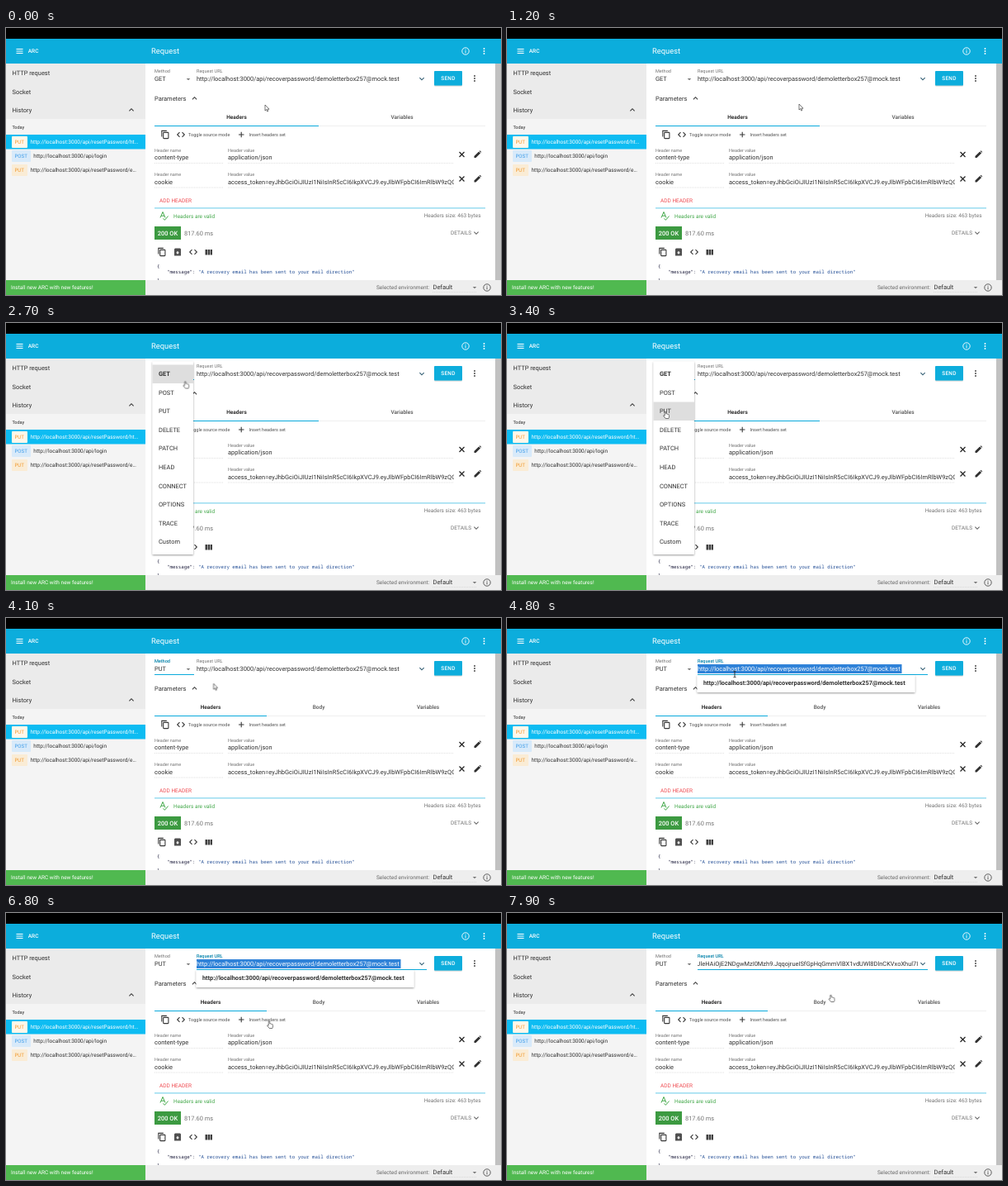
An HTML page for the animation above (8 s loop, 600x323 px).

```html
<!DOCTYPE html>
<html lang="en">
<head>
<meta charset="utf-8">
<title>Request client</title>
<style>
html, body { margin: 0; width: 100%; height: 100%; overflow: hidden; background: #fff; }
svg { display: block; width: 100%; height: 100%; }
text { font: 7.45px Roboto, Arial, sans-serif; fill: #303030; text-rendering: geometricPrecision; white-space: pre; }
.tiny { font-size: 5.55px; fill: #727272; }
.mid { font-size: 6.5px; }
.badge { font-size: 6.1px; }
.gray { fill: #757575; }
.white { fill: #fff; }
.bold { font-weight: 700; }
.semi { font-weight: 500; }
.mono { font: 500 5.76px "Noto Sans Mono", "DejaVu Sans Mono", monospace; fill: #1b1b3a; }
.blue { fill: #0aaadc; }
.center { text-anchor: middle; }
.end { text-anchor: end; }
.dots { fill: none; stroke: #ccc; stroke-width: .6; stroke-dasharray: 1 1; }
.focus { fill: none; stroke: #0aaadc; stroke-width: 1; }
.icon { fill: none; stroke: #383838; stroke-width: 1.1; }

/* State switches */
.loop { animation: 8s step-end infinite; }
.get { animation-name: get; }
.put { animation-name: put; }
.method-focus { animation-name: method-focus; }
.menu { animation-name: menu; }
.hover-get { animation-name: hover-get; }
.hover-post { animation-name: hover-post; }
.hover-put { animation-name: hover-put; }
.url-focus { animation-name: url-focus; }
.picked { animation-name: picked; }
.plain { animation-name: plain; }
.pasted { animation-name: pasted; }
.arrow { animation-name: arrow; }
.hand { animation-name: hand; }
.beam { animation-name: beam; }
@keyframes get { 0% { opacity: 1 } 45%, 100% { opacity: 0 } }
@keyframes put { 0% { opacity: 0 } 45%, 100% { opacity: 1 } }
@keyframes method-focus { 0% { opacity: 0 } 27.5% { opacity: 1 } 56.25%, 100% { opacity: 0 } }
@keyframes menu { 0% { opacity: 0 } 31.25% { opacity: 1 } 45%, 100% { opacity: 0 } }
@keyframes hover-get { 0% { opacity: 1 } 35%, 100% { opacity: 0 } }
@keyframes hover-post { 0% { opacity: 0 } 35% { opacity: 1 } 38.75%, 100% { opacity: 0 } }
@keyframes hover-put { 0% { opacity: 0 } 38.75%, 100% { opacity: 1 } }
@keyframes url-focus { 0% { opacity: 0 } 56.25%, 100% { opacity: 1 } }
@keyframes picked { 0% { opacity: 0 } 56.25% { opacity: 1 } 91.25%, 100% { opacity: 0 } }
@keyframes plain { 0% { opacity: 1 } 56.25%, 100% { opacity: 0 } }
@keyframes pasted { 0% { opacity: 0 } 91.25%, 100% { opacity: 1 } }
@keyframes arrow {
  0% { opacity: 1 } 26.25% { opacity: 0 } 46.25% { opacity: 1 }
  53.75% { opacity: 0 } 76.25% { opacity: 1 } 81.25%, 100% { opacity: 0 }
}
@keyframes hand { 0% { opacity: 0 } 26.25% { opacity: 1 } 46.25% { opacity: 0 } 81.25%, 100% { opacity: 1 } }
@keyframes beam { 0% { opacity: 0 } 53.75% { opacity: 1 } 76.25%, 100% { opacity: 0 } }

/* Continuous motion */
.cursor { animation: travel 8s ease-in-out infinite; }
@keyframes travel {
  0% { transform: translate(314px, 93px) }
  13.75%, 16.25% { transform: translate(354px, 92px) }
  27.5%, 31.25% { transform: translate(222.5px, 63px) }
  40%, 45% { transform: translate(192px, 107px) }
  55%, 73.75% { transform: translate(276px, 68px) }
  83.75%, 88.75% { transform: translate(319px, 131px) }
  97.5%, 100% { transform: translate(392.5px, 99px) }
}
.ripple { animation: ripple 8s linear infinite; transform-origin: 216px 60px; }
@keyframes ripple {
  0%, 27.5% { transform: scale(.1); opacity: .4 }
  28.75% { transform: scale(1); opacity: .4 }
  31.25%, 100% { transform: scale(1.6); opacity: 0 }
}
.grow { animation: grow 8s linear infinite; transform-origin: 204px 68.5px; }
@keyframes grow {
  0%, 27.5% { transform: scaleX(0) }
  29.2%, 100% { transform: scaleX(1) }
}
</style>
</head>
<body>
<svg viewBox="0 0 600 323" preserveAspectRatio="none">
  <defs>
    <clipPath id="methodBox"><rect x="180" y="48" width="48" height="21"/></clipPath>
    <clipPath id="urlBox"><rect x="231" y="54" width="268" height="14"/></clipPath>
    <clipPath id="valueBox"><rect x="269" y="180" width="274" height="12"/></clipPath>
    <clipPath id="codeBox"><rect x="169" y="280" width="424" height="25"/></clipPath>
    <filter id="shadow" x="-20%" y="-20%" width="140%" height="140%">
      <feDropShadow dx="0" dy="1" stdDeviation="1.3" flood-opacity=".4"/>
    </filter>
    <filter id="lift" x="-20%" y="-20%" width="140%" height="150%">
      <feDropShadow dx="0" dy=".6" stdDeviation=".7" flood-opacity=".35"/>
    </filter>
    <path id="up" d="M-2.6 1.3L0-1.3L2.6 1.3"/>
    <path id="down" d="M-2.6-1.3L0 1.3L2.6-1.3"/>
    <path id="caret" d="M-2.3-1.1H2.3L0 1.3Z" fill="#777"/>
    <path id="code" d="M-1.5-2.8L-4.3 0L-1.5 2.8M1.5-2.8L4.3 0L1.5 2.8"/>
    <path id="cross" d="M-3-3L3 3M3-3L-3 3" stroke="#282828" stroke-width="1.3"/>
    <g id="copy"><rect x="-2.3" y="-2.6" width="6.2" height="7.2" rx=".6"/><path d="M-4.2 2.6V-4.6H1.8"/></g>
    <path id="pencil" d="M-4 4V2L1.6-3.6L3.6-1.6L-2 4ZM2.2-4.1L3-4.7L4.7-3L4.1-2.2Z" fill="#303030"/>
    <g id="more"><circle cy="-3" r=".95"/><circle r=".95"/><circle cy="3" r=".95"/></g>
    <g id="info"><circle r="4.2"/><path d="M0-.6V2.3M0-2.3V-1.3"/></g>
  </defs>

  <rect width="600" height="323" fill="#fff"/>

  <!-- Drawer -->
  <rect y="43" width="169" height="67" fill="#ebebeb"/>
  <rect y="110" width="169" height="195" fill="#f4f4f4"/>
  <text x="7.5" y="57">HTTP request</text>
  <text x="7.5" y="79.5">Socket</text>
  <text x="7.5" y="102">History</text>
  <use href="#up" class="icon" x="152" y="99"/>
  <text class="tiny semi" x="7.5" y="121.8" style="fill:#505050">Today</text>

  <rect y="129" width="169" height="17.5" fill="#0dbcf2"/>
  <rect x="7" y="131" width="19" height="14" rx="1" fill="#fff7ea"/>
  <text class="badge" x="10.5" y="140.3" style="fill:#f0992e">PUT</text>
  <text class="mid white" x="29.5" y="140.4">http://localhost:3000/api/resetPassword/ht…</text>
  <rect x="7" y="148" width="23" height="14" rx="1" fill="#d8eafa"/>
  <text class="badge" x="10.5" y="157.2" style="fill:#3c9be8">POST</text>
  <text class="mid" x="33.3" y="157.3">http://localhost:3000/api/login</text>
  <rect x="7" y="165" width="19" height="14" rx="1" fill="#faecd5"/>
  <text class="badge" x="10.5" y="173.8" style="fill:#f0992e">PUT</text>
  <text class="mid" x="29.5" y="173.9">http://localhost:3000/api/resetPassword/e…</text>

  <!-- Top bars -->
  <rect width="600" height="13" fill="#000"/>
  <rect y="13" width="600" height="30" fill="#0caddc"/>
  <path d="M12.5 25.5H20.5M12.5 28H20.5M12.5 30.5H20.5" stroke="#fff"/>
  <text class="mid semi white" x="26.8" y="30.4">ARC</text>
  <text class="white" x="176" y="31.3" style="font-size:9.4px">Request</text>
  <use href="#info" x="557" y="28" fill="none" stroke="#fff" stroke-width=".9"/>
  <use href="#more" x="579.5" y="28" fill="#fff"/>

  <!-- Method -->
  <text class="tiny" x="180" y="53.6">Method</text>
  <text class="loop get" x="180" y="64.2">GET</text>
  <text class="loop put" x="180" y="64.2">PUT</text>
  <use href="#caret" x="221" y="62"/>
  <g class="loop method-focus">
    <text class="tiny blue" x="180" y="53.6">Method</text>
    <path class="focus grow" d="M180 68.5H228"/>
  </g>
  <g class="loop method-focus" clip-path="url(#methodBox)">
    <circle class="ripple" cx="216" cy="60" r="15.5" fill="#707070"/>
  </g>

  <!-- Address -->
  <text class="tiny" x="231" y="53.6">Request URL</text>
  <text class="loop plain" x="231" y="64.2">http://localhost:3000/api/recoverpassword/demoletterbox257@mock.test</text>
  <g class="loop url-focus">
    <text class="tiny blue" x="231" y="53.6">Request URL</text>
    <path class="focus" d="M231 68.5H510"/>
  </g>
  <g class="loop picked">
    <rect x="231" y="56" width="247.5" height="11" fill="#2f82d8"/>
    <text class="white" x="231" y="64.2">http://localhost:3000/api/recoverpassword/demoletterbox257@mock.test</text>
  </g>
  <g class="loop pasted" clip-path="url(#urlBox)">
    <text class="end" x="498.3" y="64.2">IJleHAiOjE2NDgwMzI0Mzh9.JqqojrueISfGpHqGmmVlBX1vdUWl8DlnCKVxoXhul7I</text>
  </g>
  <use href="#down" x="504" y="61.5" fill="none" stroke="#2d5a70" stroke-width="1.1"/>
  <rect x="519" y="52" width="34" height="17.5" rx="1" fill="#0caddc" filter="url(#lift)"/>
  <text class="mid semi white center" x="536" y="63.2" style="letter-spacing:.3px">SEND</text>
  <use href="#more" x="568" y="61" fill="#404040"/>

  <!-- Parameters -->
  <text x="180" y="88">Parameters</text>
  <use href="#up" class="icon" x="228.5" y="85"/>
  <path d="M180 118.5H581" stroke="#efefef"/>
  <g class="loop get">
    <text class="mid bold center" x="279.5" y="110">Headers</text>
    <text class="mid semi center" x="480" y="110" style="fill:#555">Variables</text>
    <path class="focus" d="M180 118.5H379"/>
  </g>
  <g class="loop put">
    <text class="mid bold center" x="248" y="110">Headers</text>
    <text class="mid semi center" x="379" y="110" style="fill:#555">Body</text>
    <text class="mid semi center" x="511.5" y="110" style="fill:#555">Variables</text>
    <path class="focus" d="M180 118.5H316"/>
  </g>

  <use href="#copy" class="icon" x="193" y="129"/>
  <use href="#code" class="icon" x="212" y="129"/>
  <text class="tiny" x="221" y="130.8" style="fill:#505050">Toggle source mode</text>
  <path class="icon" d="M282 129H288.5M285.2 125.7V132.3"/>
  <text class="tiny" x="294.5" y="130.8" style="fill:#505050">Insert headers set</text>

  <text class="tiny" x="180" y="149.8" style="font-size:5.4px">Header name</text>
  <text class="tiny" x="269" y="149.8">Header value</text>
  <text x="180" y="159.3">content-type</text>
  <text x="269" y="159.3">application/json</text>
  <path class="dots" d="M180 163.5H264M269 163.5H543"/>
  <text class="tiny" x="180" y="179" style="font-size:5.4px">Header name</text>
  <text class="tiny" x="269" y="179">Header value</text>
  <text x="180" y="188.5">cookie</text>
  <g clip-path="url(#valueBox)">
    <text x="269" y="188.5">access_token=eyJhbGciOiJIUzI1NiIsInR5cCI6IkpXVCJ9.eyJlbWFpbCI6ImRlbW9zQG1vY2su</text>
  </g>
  <path class="dots" d="M180 193H264M269 193H543"/>
  <use href="#cross" x="552.5" y="153"/>
  <use href="#cross" x="552.5" y="182.5"/>
  <use href="#pencil" x="571.5" y="153"/>
  <use href="#pencil" x="571.5" y="182.5"/>

  <text class="mid" x="186" y="211.4" style="fill:#ef4a50">ADD HEADER</text>
  <path d="M180 217.8H581" stroke="#84d5ee" stroke-width="1.2"/>
  <path d="M187 229.5L190 222.5L193 229.5M188 227.2H192M190.5 230.5L192.5 232.3L196.5 227.5" fill="none" stroke="#43a84a"/>
  <text class="mid" x="203" y="229.7" style="fill:#43a84a">Headers are valid</text>
  <text class="mid gray end" x="575.5" y="229.2">Headers size: 463 bytes</text>

  <!-- Response -->
  <rect x="180" y="240" width="32" height="16" fill="#3c9a41"/>
  <text class="semi white center" x="196" y="250.7">200 OK</text>
  <text class="gray" x="216" y="250.7">817.60 ms</text>
  <text class="mid gray" x="539" y="250.4">DETAILS</text>
  <use href="#down" x="570" y="248" fill="none" stroke="#606060" stroke-width="1.1"/>
  <use href="#copy" class="icon" x="189" y="271"/>
  <path d="M204 267.5L205 266.5H211L212 267.5V275.5H204ZM204.8 268.3H211.2M206 271.5H207.4V270H208.6V271.5H210L208 273.7Z" fill="#505050" fill-rule="evenodd"/>
  <use href="#code" class="icon" x="227" y="271"/>
  <path d="M241.5 268H244V274.5H241.5ZM244.6 268H247V274.5H244.6ZM247.6 268H250V274.5H247.6Z" fill="#404040"/>
  <g clip-path="url(#codeBox)">
    <text class="mono" x="183" y="290">{</text>
    <text class="mono" x="195" y="297.4">"message": <tspan fill="#1f4b94">"A recovery email has been sent to your mail direction"</tspan></text>
    <text class="mono" x="183" y="306.5">}</text>
  </g>
  <rect x="593" y="43" width="7" height="262" fill="#c1c1c1"/>

  <!-- Footer -->
  <rect y="305" width="169" height="18" fill="#50b950"/>
  <text class="mid white" x="6" y="316.3">Install new ARC with new features!</text>
  <rect x="169" y="305" width="431" height="18" fill="#eee"/>
  <text class="mid" x="449" y="316.3" style="fill:#666">Selected environment:</text>
  <text x="517.5" y="316.4">Default</text>
  <path class="dots" d="M517 319.5H571"/>
  <use href="#caret" x="568" y="314"/>
  <use href="#info" x="583" y="314" fill="none" stroke="#505050" stroke-width=".9"/>

  <!-- Address suggestion -->
  <g class="loop picked">
    <rect x="230.5" y="69" width="264" height="21" rx="1" fill="#fff" filter="url(#shadow)"/>
    <text class="bold" x="238" y="81.3" style="font-size:7.35px">http://localhost:3000/api/recoverpassword/demoletterbox257@mock.test</text>
  </g>

  <!-- Method list -->
  <g class="loop menu">
    <rect x="177.5" y="46.5" width="49.5" height="233.5" rx="1" fill="#fff" filter="url(#shadow)"/>
    <g fill="#dedede">
      <rect class="loop hover-get" x="177.5" y="50.5" width="49.5" height="22.5"/>
      <rect class="loop hover-post" x="177.5" y="73" width="49.5" height="22.5"/>
      <rect class="loop hover-put" x="177.5" y="95.5" width="49.5" height="22.5"/>
    </g>
    <text class="bold" x="185" y="64.2">GET</text>
    <text x="185" y="86.7">POST</text>
    <text x="185" y="109.3">PUT</text>
    <text x="185" y="131.8">DELETE</text>
    <text x="185" y="154.4">PATCH</text>
    <text x="185" y="176.9">HEAD</text>
    <text x="185" y="199.5">CONNECT</text>
    <text x="185" y="222">OPTIONS</text>
    <text x="185" y="244.6">TRACE</text>
    <text x="185" y="267.1">Custom</text>
  </g>

  <!-- Pointer -->
  <g class="cursor" fill="#fff" stroke="#222" stroke-width=".6" stroke-linejoin="round">
    <path class="loop arrow" d="M0 0V7L1.6 5.6L2.7 8.1L3.8 7.6L2.8 5.2H5Z"/>
    <path class="loop hand" d="M-.8 .6Q0-.5 .8 .6V3Q1.7 2.5 2.2 3.3Q3 2.9 3.5 3.7Q4.5 3.4 4.6 4.4V6Q4.5 7.2 3.8 8.5H.2L-2.4 5.3Q-2.4 4.2-.8 5.1Z"/>
    <path class="loop beam" d="M-1.5-3.8Q0-3.8 0-3V3Q0 3.8-1.5 3.8M1.5-3.8Q0-3.8 0-3M0 3Q0 3.8 1.5 3.8" fill="none" stroke-width=".9"/>
  </g>
</svg>
</body>
</html>
```
